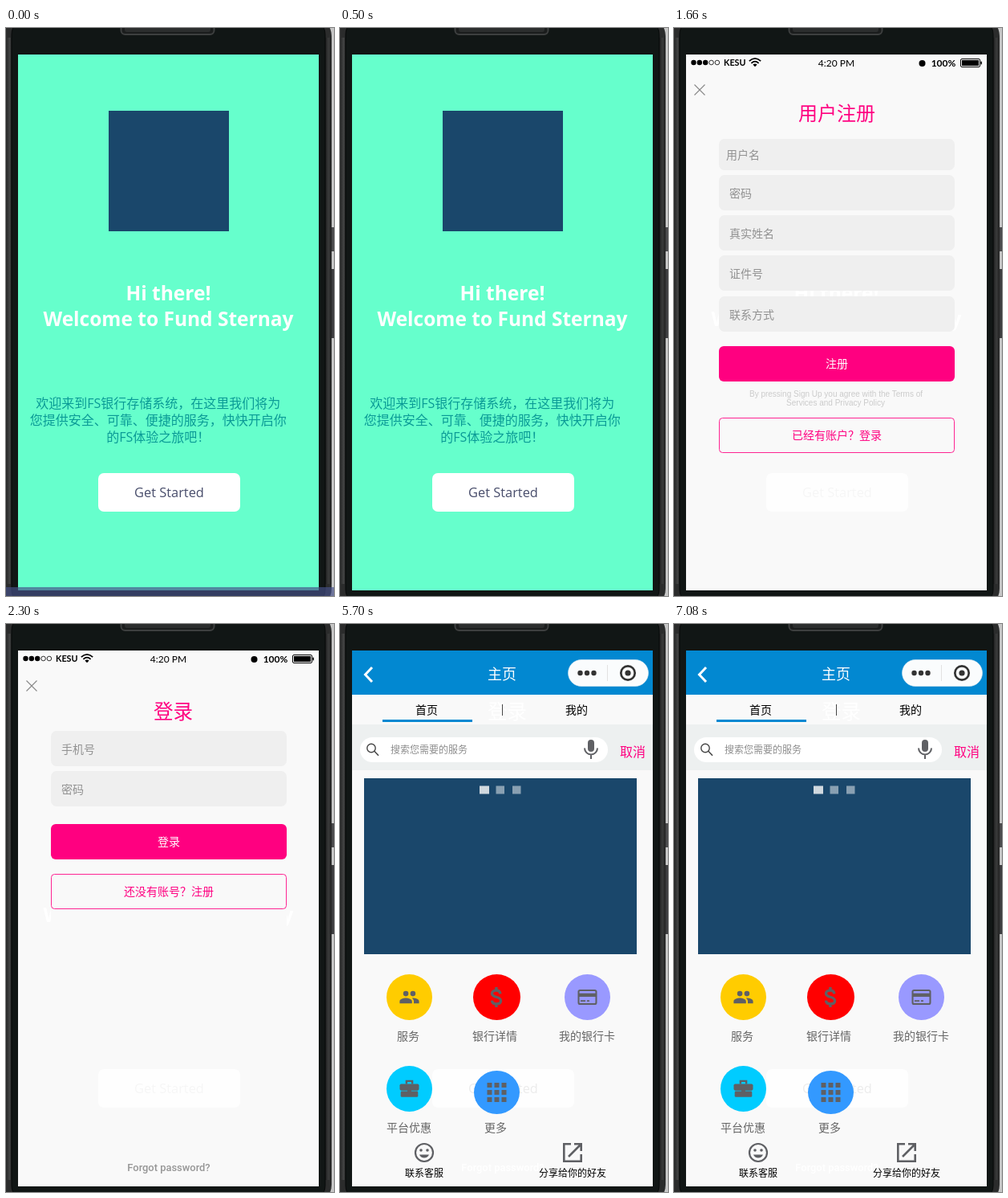
An HTML page for the animation above (8000 ms loop, 409 by 707 pixels).

```html
<!DOCTYPE html>
<html lang="zh-CN">
<head>
<meta charset="utf-8">
<title>Mobile app walkthrough</title>
<style>
  html, body { margin: 0; width: 100%; height: 100%; overflow: hidden; background: #111615; }
  svg { display: block; width: 409px; height: 707px; }
  text { font-family: "Open Sans", "Noto Sans CJK SC", "Noto Sans CJK", sans-serif; white-space: pre; }
  .cjk { font-family: "Noto Sans CJK SC", "Noto Sans CJK", sans-serif; }
  .arial { font-family: "Liberation Sans", Arial, sans-serif; }
  .roboto { font-family: Roboto, sans-serif; }
  .lato { font-family: Lato, sans-serif; }
</style>
</head>
<body>
<svg id="stage" viewBox="0 0 409 707" xmlns="http://www.w3.org/2000/svg"></svg>
<script>
const LOOP = 8000;
const PINK = '#ff0080', NAVY = '#1a476b', BLUE = '#0288d1', PAPER = '#f9f9f9', ICON = '#5f6064';

const rect = (x, y, w, h, fill, r = 0, extra = '') =>
  `<rect x="${x}" y="${y}" width="${w}" height="${h}" rx="${r}" fill="${fill}" ${extra}/>`;
const ellipse = (x, y, rx, ry, fill, extra = '') =>
  `<ellipse cx="${x}" cy="${y}" rx="${rx}" ry="${ry}" fill="${fill}" ${extra}/>`;
const circle = (x, y, r, fill, extra = '') => ellipse(x, y, r, r, fill, extra);
const line = (d, color, width, extra = '') =>
  `<path d="${d}" fill="none" stroke="${color}" stroke-width="${width}" ${extra}/>`;
const label = (str, x, y, size, fill, { anchor = 'middle', weight = 400, font = '' } = {}) =>
  `<text class="${font}" x="${x}" y="${y}" font-size="${size}" fill="${fill}" text-anchor="${anchor}" font-weight="${weight}">${str}</text>`;
// Chinese text placed by the vertical centre of its glyphs
const cjk = (str, x, mid, size, fill, options = {}) =>
  label(str, x, mid + size * 0.38, size, fill, { font: 'cjk', ...options });
const icon = (x, y, scale, body) =>
  `<g transform="translate(${x} ${y}) scale(${scale}) translate(-12 -12)" fill="${ICON}">${body}</g>`;

const screen = fill => rect(15, 33, 375, 667, fill);

const phone = () => `
  <defs>
    <linearGradient id="edge"><stop offset="0" stop-color="#252626"/><stop offset=".7" stop-color="#454646"/><stop offset="1" stop-color="#1c1d1d"/></linearGradient>
    <linearGradient id="rim"><stop offset="0" stop-color="#1c1d1d"/><stop offset=".5" stop-color="#3a3b3b"/><stop offset="1" stop-color="#222"/></linearGradient>
  </defs>
  ${rect(0, 0, 409, 707, '#c6c6c6')}
  ${rect(-4, -14, 410, 736, '#2b2c2c', 24)}
  ${rect(0, 12, 7, 680, 'url(#edge)')}${rect(398, 12, 8, 680, 'url(#rim)')}
  ${rect(7, -12, 391, 731, '#111615', 20, 'stroke="#070909"')}
  ${rect(143.5, -8, 116, 16, '#1b1d1d', 5, 'stroke="#3d3f3f" stroke-width="2"')}
  ${rect(148, -4, 107, 9, '#2c2e2e', 3)}
  ${rect(406, 248, 3, 30, '#4a4a4c')}${rect(406, 300, 3, 86, '#3d3d3f')}`;

const heading = () =>
  label('Hi there!', 202.5, 339, 24.5, '#fff', { weight: 700 }) +
  label('Welcome to Fund Sternay', 202.5, 371, 24.5, '#fff', { weight: 700 });

const startButton = (fill, ink) =>
  rect(115, 554, 177, 48, fill, 7) + label('Get Started', 203.5, 584, 16.4, ink);

const welcome = () => screen('#66ffcc') + rect(128, 103, 150, 150, NAVY) + heading() +
  ['欢迎来到FS银行存储系统，在这里我们将为', '您提供安全、可靠、便捷的服务，快快开启你', '的FS体验之旅吧！']
    .map((str, i) => label(str, 189.7, 472.5 + i * 21, 16, '#0a9a96')).join('') +
  startButton('#fff', '#484d6b');

const statusBar = () => {
  const dots = [0, 1, 2, 3, 4].map(i =>
    circle(24.5 + i * 7.35, 43, i < 3 ? 3.2 : 2.8, i < 3 ? '#000' : 'none', i < 3 ? '' : 'stroke="#000" stroke-width=".8"')).join('');
  const wifi = line('M93.8 41.2Q101 34.6 108.2 41.2M96.4 43.8Q101 39.6 105.6 43.8', '#000', 1.7) +
    '<path d="M98.4 45.6Q101 43.4 103.6 45.6L101 48.3Z"/>';
  return dots + wifi +
    label('KESU', 62, 47, 10.8, '#000', { anchor: 'start', weight: 700, font: 'lato' }) +
    label('4:20 PM', 202.5, 47.5, 12, '#000', { font: 'lato' }) +
    circle(309.5, 44, 4, '#000') +
    label('100%', 336, 48, 12, '#000', { weight: 700, font: 'lato' }) +
    rect(357.5, 38.5, 24, 10, 'none', 1.5, 'stroke="#000"') + rect(359, 40, 21, 7, '#000') +
    rect(382.5, 41.5, 1.5, 4, '#000', 0.7);
};

const formBase = () => statusBar() + line('M25.5 70.5L38.5 83.5M38.5 70.5L25.5 83.5', '#888', 1.1);
const field = (str, y, h = 44, x = 69) =>
  rect(56, y, 294, h, '#efefef', 7) + cjk(str, x, y + h / 2 + 0.5, 14, '#919191', { anchor: 'start' });
const solidButton = (str, y) => rect(56, y, 294, 44, PINK, 6) + cjk(str, 203, y + 22, 14, '#fff');
const outlineButton = (str, y) =>
  rect(56.5, y + 0.5, 293, 43, PAPER, 4, `stroke="${PINK}" stroke-opacity=".85"`) + cjk(str, 203, y + 22, 14, PINK);

const register = () => screen(PAPER) + heading() + startButton('#fefefe', '#f6f6f6') + formBase() +
  cjk('用户注册', 203, 106, 24, PINK, { weight: 300 }) +
  field('用户名', 138, 39, 65) +
  ['密码', '真实姓名', '证件号', '联系方式'].map((str, i) => field(str, [183, 233, 283, 334][i])).join('') +
  solidButton('注册', 396) +
  label('By pressing Sign Up you agree with the Terms of', 202, 459, 10, '#cbcbcb', { font: 'arial' }) +
  label('Services and Privacy Policy', 201.5, 470, 10, '#cbcbcb', { font: 'arial' }) +
  outlineButton('已经有账户？登录', 485);

const forgot = fill => label('Forgot password?', 203, 681, 12.9, fill, { weight: 500, font: 'roboto' });

const login = () => screen(PAPER) + heading() + rect(56, 300, 294, 100, PAPER) +
  startButton('#fefefe', '#f6f6f6') + formBase() +
  cjk('登录', 208.5, 109, 24.5, PINK) +
  field('手机号', 133) + field('密码', 183) +
  solidButton('登录', 249) + outlineButton('还没有账号？注册', 311) + forgot('#969696');

const people = () => circle(8, 8, 3, ICON) + circle(16, 8, 3, ICON) +
  '<path d="M1 19V16.5C1 14.2 5.7 13 8 13S15 14.2 15 16.5V19ZM17 19V16.5C17 15 16.2 13.9 15 13.05C18 12.8 23 14.2 23 16.5V19Z"/>';
const dollar = () => line('M15.1 9C15 6.9 13.6 6 11.6 6C9.4 6 7.7 7 7.7 8.8C7.7 10.7 9.5 11.3 12 12C14.5 12.7 15.6 13.6 15.6 15.3C15.6 17.1 14 18.1 11.7 18.1C9.3 18.1 7.8 17 7.7 15M11.6 3V6M11.6 18V21', ICON, 2.4);
const card = () => rect(3, 5, 18, 14, 'none', 1.5, `stroke="${ICON}" stroke-width="1.7"`) + rect(3, 8, 18, 3.6, ICON) +
  line('M5 15.8H10M11.5 15.8H14', ICON, 1.3);
const briefcase = () => rect(2, 7, 20, 6.8, ICON, 1.5) + rect(3, 14.6, 18, 6, ICON, 1.2) + rect(10, 12.4, 4, 3.4, ICON) +
  line('M9 7V4H15V7', ICON, 2);
const grid = () => [4, 10, 16].flatMap(y => [4, 10, 16].map(x => rect(x, y, 4, 4, ICON))).join('');

const navBar = () => rect(15, 33, 375, 55, BLUE) +
  line('M40 54L31.5 63L40 72', '#fff', 3) +
  cjk('主页', 202, 62, 18, '#fff') +
  rect(284.5, 44.5, 100, 33, '#fafcfd', 16.5, 'stroke="#dbe9f1" stroke-width=".6"') +
  [299.5, 308, 316.5].map(x => circle(x, 61, 3.2, '#333')).join('') +
  line('M333.5 51V71', '#e2e2e2', 1) +
  circle(359, 61, 8.7, 'none', 'stroke="#333" stroke-width="2.7"') + circle(359, 61, 3.6, '#333');

const tabs = () => cjk('登录', 208.5, 109, 24.5, '#fff') +
  cjk('首页', 108, 107, 14, '#000') + cjk('我的', 295, 107, 14, '#000') +
  rect(53, 119, 112, 3, BLUE) + line('M202.5 100V114', '#444', 1);

const searchBar = () => rect(15, 125, 375, 57, '#edf0f0') + rect(25, 141, 309, 31, '#fff', 15.5) +
  circle(39, 154.5, 5.2, 'none', 'stroke="#444" stroke-width="1.4"') + line('M42.8 158.3L48 163.8', '#444', 1.5) +
  cjk('搜索您需要的服务', 63, 156.5, 12, '#8c8c8c', { anchor: 'start' }) +
  rect(309, 144, 8, 15, ICON, 4) + line('M305 154.5A8 8 0 0 0 321 154.5M313 162.5V168', ICON, 2) +
  cjk('取消', 365, 158.5, 16, PINK);

const banner = () => rect(30, 192, 340, 219, NAVY) +
  [174, 194.5, 215].map((x, i) => rect(x, 201.5, i ? 10.5 : 12, 10, '#e4e9ed', 0, `opacity="${i ? 0.55 : 0.9}"`)).join('');

const menuItem = (x, y, rx, ry, fill, name, nameX, nameY, scale, art) =>
  ellipse(x, y, rx, ry, fill) + icon(x, y, scale, art) + cjk(name, nameX, nameY, 14, '#666');
const menu = () =>
  menuItem(86.5, 464.5, 28.5, 28.5, '#ffcc00', '服务', 85, 513, 1.1, people()) +
  menuItem(195.5, 464.5, 29.5, 28.5, '#ff0000', '银行详情', 193, 513, 1.4, dollar()) +
  menuItem(308.5, 464.5, 28.5, 28.5, '#9999ff', '我的银行卡', 308, 513, 1.22, card()) +
  menuItem(86.5, 578.5, 28.5, 28.5, '#00ccff', '平台优惠', 86, 627, 1.2, briefcase()) +
  menuItem(195.5, 583, 28.5, 27, '#3399ff', '更多', 194, 627, 1.5, grid());

const footer = () => forgot('#fff') +
  circle(105, 658, 11, 'none', `stroke="${ICON}" stroke-width="2.2"`) +
  circle(101, 655, 1.8, ICON) + circle(109, 655, 1.8, ICON) +
  `<path d="M99 660.5H111A6.5 6.5 0 0 1 99 660.5Z" fill="${ICON}"/>` +
  line('M288 647.3H279.3V668.7H300.7V660M292 647.3H300.7V656M300 648L285 663', ICON, 2.6) +
  cjk('联系客服', 105, 683, 12, '#000') + cjk('分享给你的好友', 290, 683, 12, '#000');

const home = () => screen(PAPER) + navBar() + tabs() + searchBar() + banner() +
  startButton('#fefefe', '#ececec') + menu() + footer();

const taskbar = () => rect(0, 696, 409, 11, '#465088', 0, 'opacity=".68"');

const scenes = [
  { draw: welcome, from: 0, to: 700 },
  { draw: taskbar, from: 0, to: 500 },
  { draw: register, from: 700, to: 2300 },
  { draw: login, from: 2300, to: 5700 },
  { draw: home, from: 5700, to: LOOP },
];

const stage = document.getElementById('stage');
stage.innerHTML = phone() + scenes.map(({ draw }) => `<g class="scene">${draw()}</g>`).join('');

// One held keyframe per change, each at its own distinct offset
const visibleAt = ({ from, to }, time) => (time >= from && time < to ? 1 : 0);
stage.querySelectorAll('.scene').forEach((group, i) => {
  const scene = scenes[i];
  const times = [...new Set([0, scene.from, scene.to, LOOP])];
  group.animate(
    times.map(time => ({ offset: time / LOOP, opacity: visibleAt(scene, time), easing: 'step-end' })),
    { duration: LOOP, iterations: Infinity });
});
</script>
</body>
</html>
```
